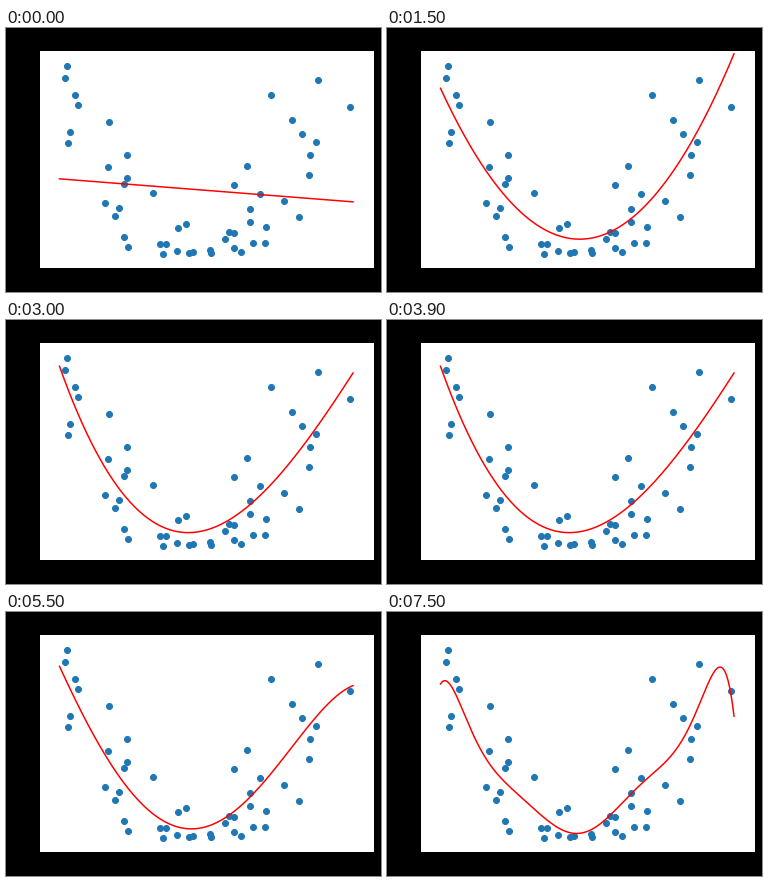
A matplotlib script for the animation above (8 s loop, 375 by 264 pixels).

```python
import numpy as np
import matplotlib.pyplot as plt
from matplotlib.animation import FuncAnimation
from matplotlib.patches import Rectangle

W, H, DPI = 375, 264, 72
STEP = 250  # ms per tick
DEGREES = np.repeat([1, 2, 3, 4, 5, 6, 8], [6, 6, 6, 4, 5, 3, 2])

# Sample positions in stage pixels, y pointing down
PX = np.array([
    60, 58, 68, 71, 63, 61, 102, 101, 120, 120, 117, 146, 98, 112, 108, 117,
    121, 153, 159, 156, 171, 179, 170, 182, 186, 203, 204, 218, 222, 227, 227,
    234, 227, 240, 253, 277, 243, 243, 259, 246, 258, 264, 285, 295, 309, 303,
    302, 311, 343, 292])
PY = np.array([
    37, 49, 66, 76, 103, 114, 93, 138, 126, 149, 155, 164, 174, 179, 187, 208,
    218, 215, 215, 225, 199, 195, 222, 224, 223, 221, 224, 210, 203, 204, 219,
    223, 156, 137, 165, 172, 180, 193, 198, 214, 214, 66, 91, 105, 113, 126,
    146, 51, 78, 188])

xs = np.linspace(53.5, 347, 200)


def scaled(x):
    return (x - 200) / 147


def fit(degree):
    return np.polyval(np.polyfit(scaled(PX), PY, degree), scaled(xs))


curves = {d: fit(d) for d in set(DEGREES.tolist())}

fig = plt.figure(figsize=(W / DPI, H / DPI), dpi=DPI, facecolor="black")
ax = fig.add_axes([0, 0, 1, 1])
ax.set_xlim(0, W)
ax.set_ylim(H, 0)
ax.axis("off")

ax.add_patch(Rectangle((34, 23), 334, 217, fc="white", ec="none"))
ax.scatter(PX + 0.5, PY + 0.5, s=36, color="C0")
line, = ax.plot([], [], color="red", lw=1.5, zorder=3)


def draw(i):
    line.set_data(xs, curves[int(DEGREES[i])] + 0.5)
    return line,


anim = FuncAnimation(fig, draw, frames=len(DEGREES), interval=STEP,
                     repeat=True, repeat_delay=0)
plt.show()
```
